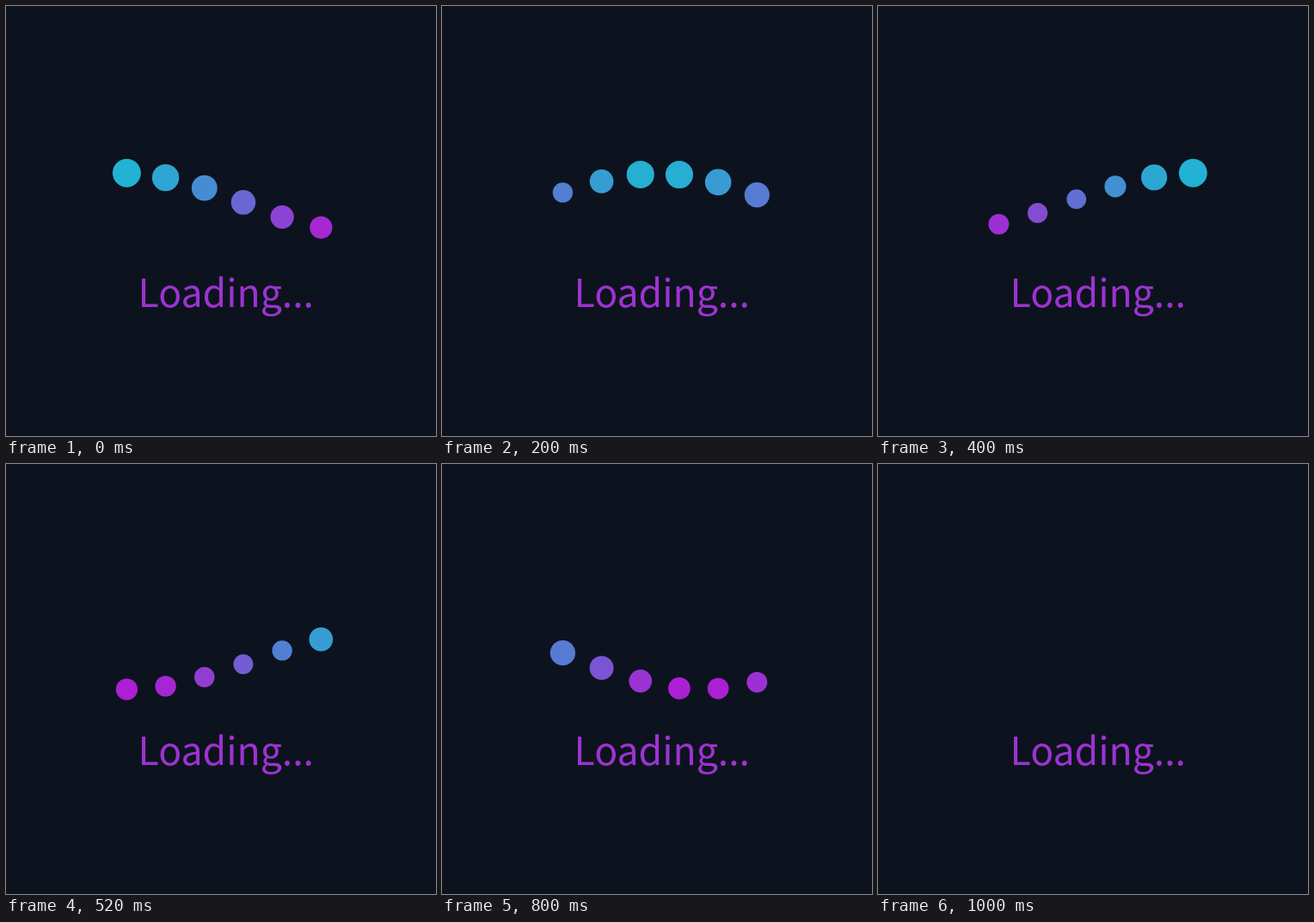
An HTML page with a canvas for the animation above (1040 ms loop, 500 by 500 pixels).

```html
<!DOCTYPE html>
<html lang="en">
<head>
<meta charset="utf-8">
<title>Loading</title>
<style>
html, body { margin: 0; width: 100%; height: 100%; overflow: hidden; background: #0d131e; }
canvas { display: block; width: 500px; height: 500px; }
</style>
</head>
<body>
<canvas id="stage" width="500" height="500"></canvas>
<script>
const ctx = document.getElementById('stage').getContext('2d');
const LOOP = 1040, STEP = 40, CYCLE = 1000, LAG = 80;
const CYAN = [34, 178, 211], MAGENTA = [174, 30, 211];

const mix = (a, b, u) => a + (b - a) * u;

// Cubic ease with control points (x1,y1) and (x2,y2)
function ease(u, x1, y1, x2, y2) {
  const at = (a, b, s) => 3 * (1 - s) * (1 - s) * s * a + 3 * (1 - s) * s * s * b + s * s * s;
  let lo = 0, hi = 1;
  for (let i = 0; i < 24; i++) {
    const mid = (lo + hi) / 2;
    if (at(x1, x2, mid) < u) lo = mid; else hi = mid;
  }
  return at(y1, y2, (lo + hi) / 2);
}

// 0 at the top of the swing, 1 at the bottom
function drop(p) {
  return p < 520
    ? ease(p / 520, 0.4, 0.08, 0.635, 1)
    : 1 - ease((p - 520) / 480, 0.365, 0, 0.6, 0.935);
}

// Quick shrink, then slow growth
function radius(p) {
  if (p < 240) return mix(16.5, 11.35, ease(p / 240, 0.364, 0.05, 0.636, 1));
  const u = (p - 240) / 760;
  return mix(11.35, 16.5, u - 0.55 * u * (1 - u));
}

function drawDot(i, time) {
  const p = (time - i * LAG + CYCLE) % CYCLE;
  const d = drop(p);
  ctx.fillStyle = `rgb(${CYAN.map((c, k) => Math.round(mix(c, MAGENTA[k], d)))})`;
  ctx.beginPath();
  ctx.arc(140.4 + 45.18 * i, mix(194.2, 262, d), radius(p), 0, Math.PI * 2);
  ctx.fill();
}

function drawLabel() {
  ctx.font = '300 44.6px "Noto Sans CJK SC", "Noto Sans CJK JP", "Noto Sans CJK", sans-serif';
  ctx.fillStyle = '#9c33d1';
  const ink = ctx.measureText('Loading...').actualBoundingBoxLeft;
  ctx.fillText('Loading...', 157.5 + ink, 349.5);
}

function draw(now) {
  const time = Math.floor((now % LOOP) / STEP) * STEP;
  ctx.fillStyle = '#0d131e';
  ctx.fillRect(0, 0, 500, 500);
  drawLabel();
  // The dots blink out for the last step of the loop
  if (time < CYCLE) for (let i = 0; i < 6; i++) drawDot(i, time);
}

let start = null;
function tick(now) {
  if (start === null) start = now;
  draw(now - start);
  requestAnimationFrame(tick);
}
draw(0);
requestAnimationFrame(tick);
</script>
</body>
</html>
```
